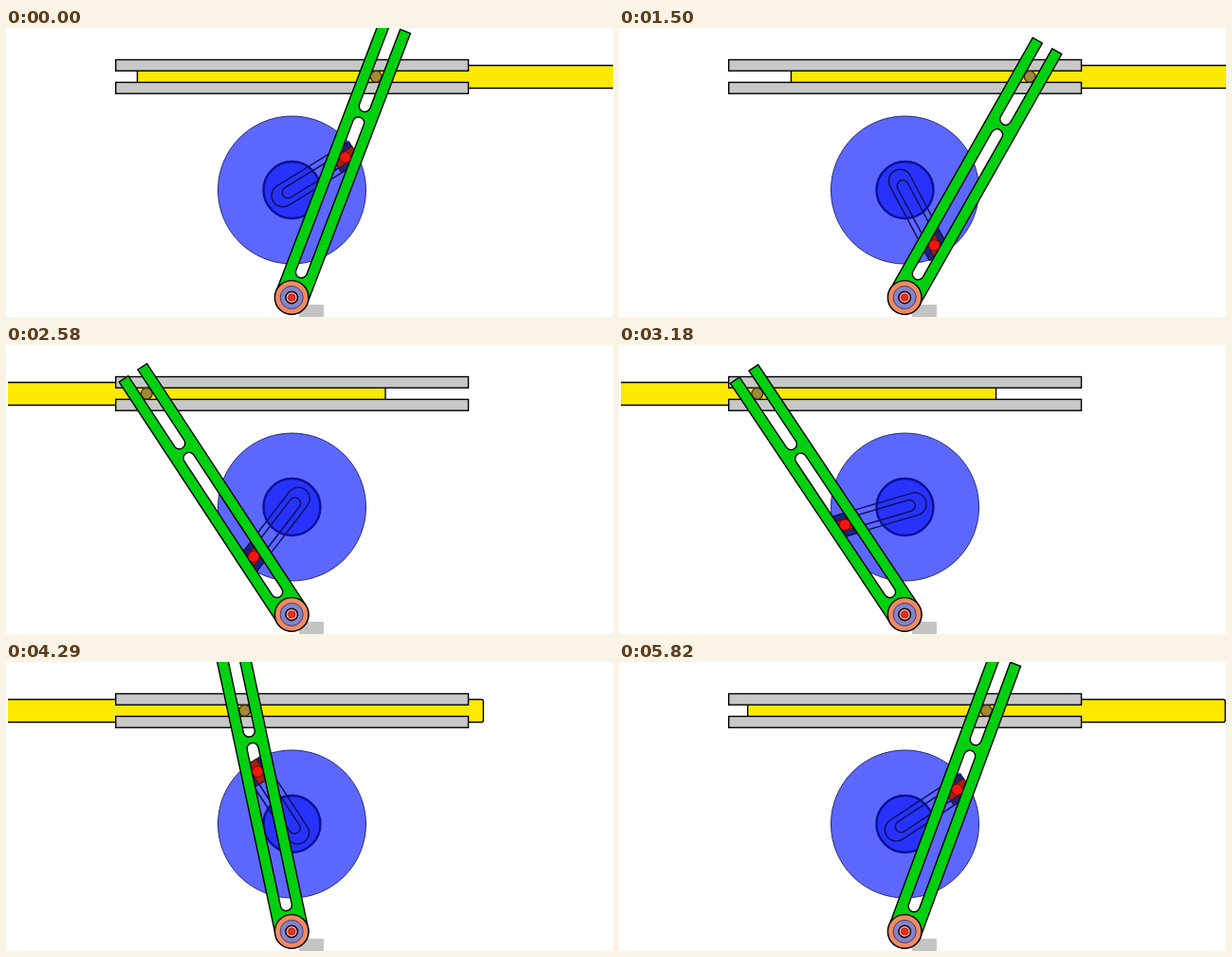
Animation, 640 px wide and 305 px high, one loop 5.92 s. Source, as an HTML page:

```html
<!DOCTYPE html>
<html lang="en">
<head>
<meta charset="utf-8">
<title>Crank and slotted lever</title>
<style>
  html, body { margin: 0; width: 100%; height: 100%; overflow: hidden; background: #fff; }
  svg { display: block; width: 640px; height: 305px; }
  .line { stroke: #000; stroke-width: 1.4; }
  .crank { fill: none; stroke: #10105c; stroke-width: 1.5; }
</style>
</head>
<body>
<svg viewBox="0 0 640 305">
  <defs><clipPath id="stage"><rect x="2" width="638" height="305"/></clipPath></defs>

  <g clip-path="url(#stage)">
    <rect id="bar" class="line" x="-251.75" y="39.5" width="503.5" height="24" rx="2" fill="#fce900"/>
  </g>
  <g class="line" fill="#c8c8c8">
    <rect x="115.7" y="33.5" width="371.8" height="11.7"/>
    <rect x="115.7" y="57.4" width="371.8" height="11.8"/>
  </g>
  <circle id="slider" cy="51.3" r="5.9" fill="#a08a34" stroke="#3c300c" stroke-width="1.3"/>

  <circle cx="301.5" cy="171" r="78" fill="#5c67ff" stroke="#282c70"/>
  <circle cx="301.5" cy="171" r="30" fill="#2733fc" stroke="#0a1096" stroke-width="2.4"/>
  <g id="crank">
    <path class="crank" d="M78-12H-11A12 12 0 0 0-11 12H78M78-6H-5a6 6 0 0 0 0 12H78"/>
    <rect x="54" y="-12" width="24" height="24" fill="#20207e" stroke="#10104c"/>
    <rect x="54" y="-6" width="24" height="12" fill="#a0220e" stroke="#4c1010"/>
  </g>

  <rect x="309" y="292" width="26" height="13" rx="1" fill="#c4c4c4"/>
  <path id="lever" class="line" fill="#00d010" fill-rule="evenodd"
    d="M-17.6 0V-305H-6V-216A6 6 0 0 0 6-216V-305H17.6V0A17.6 17.6 0 0 1-17.6 0Z
       M-6-197.3a6 6 0 0 1 12 0V-28.4a6 6 0 0 1-12 0Z"/>
  <circle id="pin" r="5.7" fill="#fa1410" stroke="#6c1010"/>
  <g class="line" transform="translate(301.2 284.4)">
    <circle r="17.8" fill="#f08a62"/>
    <circle r="12" fill="#8484cc" stroke="#443c60" stroke-width="1"/>
    <circle r="6.3" fill="#f6a08c"/>
    <circle r="3.6" fill="#ee2c24" stroke="#901c18" stroke-width=".8"/>
  </g>
</svg>
<script>
const LOOP = 5920, RADIUS = 66;
const hub = { x: 301.5, y: 171 }, pivot = { x: 301.3, y: 284.3 }, barY = 51.2;

// The picture holds each step for 120 ms, apart from these.
const holds = { 1: 160, 2: 140, 12: 150, 16: 150, 17: 160, 19: 140, 33: 150,
  34: 130, 36: 140, 38: 150, 40: 150, 46: 100 };
const starts = [];
for (let i = 0, t = 0; t < LOOP; t += holds[i++] || 120) starts.push(t);

// Time in ms and crank angle in degrees, clockwise from the right.
const turns = [[0, -31.6], [120, -27.3], [900, 25.2], [2010, 93.4], [3180, 163.5],
  [4290, 236.8], [4540, 247], [4800, 264.5], [5070, 281], [5220, 290.7],
  [5700, 320.9], [5820, 326.6], [LOOP, 328.4]];

function crankAngle(t) {
  const i = turns.findIndex(([time]) => time > t);
  const [t0, a0] = turns[i - 1], [t1, a1] = turns[i];
  return a0 + (a1 - a0) * (t - t0) / (t1 - t0);
}

const el = id => document.getElementById(id);
const place = (id, x, y, turn = 0) =>
  el(id).setAttribute('transform', `translate(${x} ${y}) rotate(${turn})`);

function pose(t) {
  const angle = crankAngle(t), rad = angle * Math.PI / 180;
  const x = hub.x + RADIUS * Math.cos(rad), y = hub.y + RADIUS * Math.sin(rad);
  const lean = Math.atan2(x - pivot.x, pivot.y - y);
  const barX = pivot.x + Math.tan(lean) * (pivot.y - barY);
  place('crank', hub.x, hub.y, angle);
  place('pin', x, y);
  place('lever', pivot.x, pivot.y, lean * 180 / Math.PI);
  place('bar', barX, 0);
  place('slider', barX, 0);
}

const begin = performance.now();
function tick() {
  const t = (performance.now() - begin) % LOOP;
  pose(starts.findLast(start => start <= t));
  requestAnimationFrame(tick);
}
tick();
</script>
</body>
</html>
```
